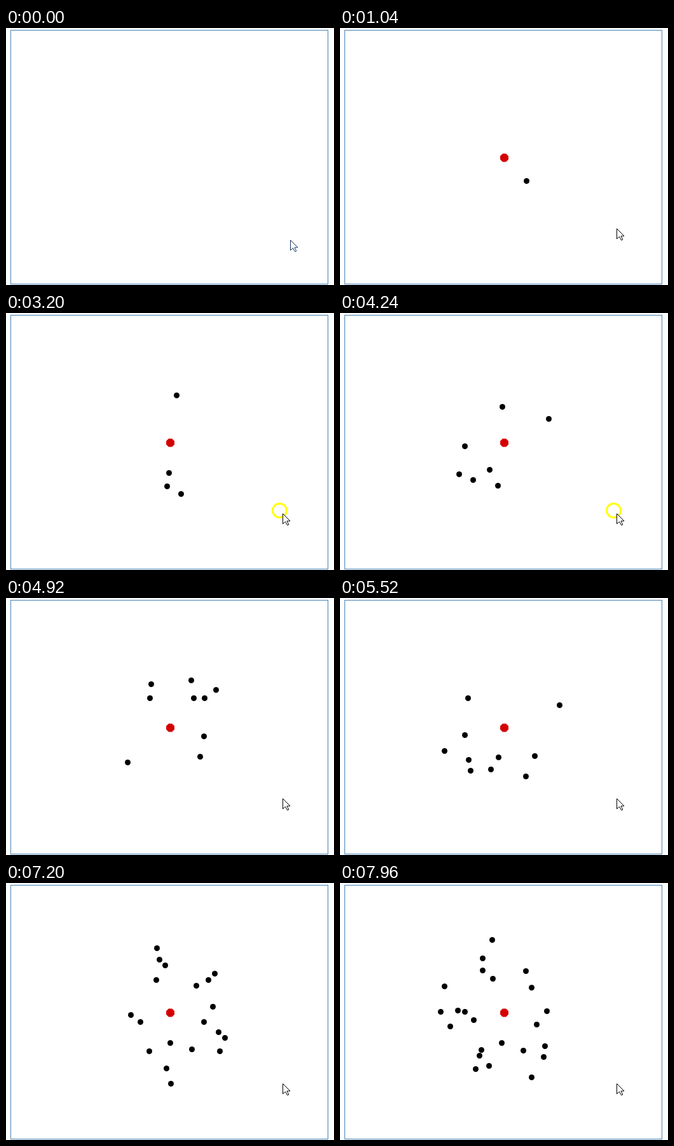
Recreate the animation shown at these times as an HTML page with a canvas. Size 516 px wide and 404 px high, loop 8 s.

```html
<!DOCTYPE html>
<html lang="en">
<head>
<meta charset="utf-8">
<title>Orbiting dots</title>
<style>
  html, body { margin: 0; width: 100%; height: 100%; overflow: hidden; background: #fff; }
  canvas { display: block; }
</style>
</head>
<body>
<canvas id="stage" width="516" height="404"></canvas>
<script>
const ctx = document.getElementById('stage').getContext('2d');
const LOOP = 8000;
const SUN = { x: 258, y: 204 };
const RAD = Math.PI / 180;

// Bursts of clicks; every click releases a dot (times in ms).
const bursts = [
  { start: 690, count: 2, gap: 665 },
  { start: 1912, count: 1, gap: 0 },
  { start: 2964, count: 3, gap: 255 },
  { start: 4070, count: 3, gap: 206 },
  { start: 5306, count: 2, gap: 294 },
  { start: 5800, count: 12, gap: 193 }
];
const births = bursts.flatMap(({ start, count, gap }) =>
  Array.from({ length: count }, (_, i) => start + i * gap));

// Widening orbit: squared mean radius grows with the angle travelled (degrees),
// speed falls with the root of the radius, and an epicycle makes it wobble.
const START_ANGLE = -180;
const EPICYCLE = 208;
const WOBBLE = 3.2;
const meanSquare = angle => 2960 + 5.15 * angle;
const wobblePhase = angle => (angle - 28) * 360 / EPICYCLE * RAD;

function orbit(age) {
  const square = (meanSquare(START_ANGLE) ** 1.25 + 16.74 * age) ** .8;
  const meanAngle = (square - meanSquare(0)) / 5.15;
  const angle = meanAngle - 212 / Math.sqrt(square) * Math.sin(wobblePhase(meanAngle));
  const radius = Math.sqrt(meanSquare(angle)) + WOBBLE * Math.cos(wobblePhase(angle));
  return {
    x: Math.round(SUN.x + radius * Math.cos(angle * RAD)),
    y: Math.round(SUN.y - radius * Math.sin(angle * RAD))
  };
}

function disc(x, y, r, color) {
  ctx.beginPath();
  ctx.arc(x + .5, y + .5, r, 0, 2 * Math.PI);
  ctx.fillStyle = color;
  ctx.fill();
}

function polygon(points, x, y) {
  ctx.beginPath();
  for (const [px, py] of points) ctx.lineTo(x + px, y + py);
  ctx.closePath();
}

function drawSun() {
  const corners = Array.from({ length: 8 }, (_, i) => {
    const a = (i * 45 + 22.5) * RAD;
    return [7 * Math.cos(a), 7 * Math.sin(a)];
  });
  polygon(corners, SUN.x + .5, SUN.y);
  ctx.fillStyle = '#d40000';
  ctx.fill();
}

function drawRing() {
  ctx.beginPath();
  ctx.arc(430.5, 310.5, 11, 0, 2 * Math.PI);
  ctx.lineWidth = 3;
  ctx.strokeStyle = '#ff0';
  ctx.stroke();
}

const arrow = [[0, 0], [0, 16], [4, 12.5], [7, 18], [9, 17.5], [9, 16.5], [6.5, 11.5], [11.5, 11.5]];

function drawCursor(t) {
  const step = Math.max(0, Math.min(3, Math.floor((t - 280) / 40)));
  polygon(arrow, 447.5 - 4 * step, 333.5 - 6 * step);
  ctx.fillStyle = '#fff';
  ctx.fill();
  ctx.lineWidth = 1;
  ctx.strokeStyle = step ? '#000' : '#17375e';
  ctx.stroke();
}

function draw(t) {
  ctx.fillStyle = '#fff';
  ctx.fillRect(0, 0, 516, 404);
  ctx.lineWidth = 1;
  ctx.strokeStyle = '#4682b4';
  ctx.strokeRect(7.5, 3.5, 499, 399);

  if (t >= births[0]) drawSun();
  for (const birth of births) {
    if (t < birth) continue;
    const { x, y } = orbit(t - birth);
    disc(x, y, 4.5, '#000');
  }
  if (births.some(birth => birth > t && birth - t <= 60)) drawRing();
  drawCursor(t);
}

function tick() {
  draw(performance.now() % LOOP);
  requestAnimationFrame(tick);
}
tick();
</script>
</body>
</html>
```
